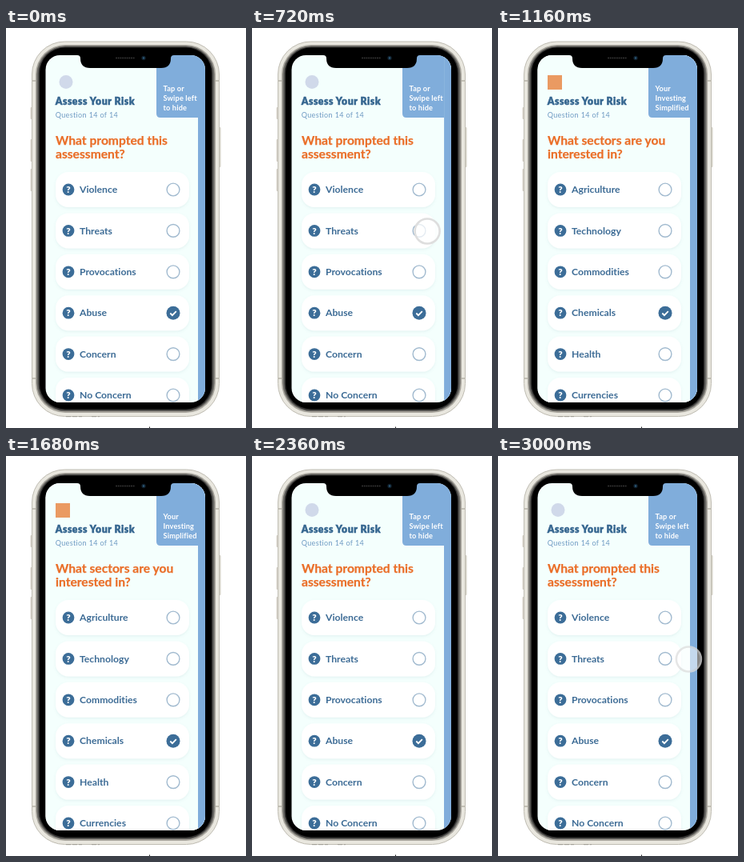
An HTML page that plays this animation: 300x500 px, repeating every 3040 ms.

```html
<!DOCTYPE html>
<html lang="en">
<head>
<meta charset="utf-8">
<title>Swipe to hide</title>
<style>
  html, body { margin: 0; width: 100%; height: 100%; overflow: hidden; background: #fff; }
  svg { display: block; width: 300px; height: 500px; font-family: Lato, "Open Sans", sans-serif; font-weight: 700; font-variant-ligatures: none; }
  .tab { font-size: 9.2px; letter-spacing: .15px; fill: #fff; }
  .title { font-size: 12.2px; font-weight: 900; letter-spacing: .55px; fill: #34658f; stroke: #34658f; stroke-width: .5px; }
  .count { font-size: 9px; font-weight: 400; letter-spacing: .37px; fill: #6f9ac3; }
  .head { font-size: 15.6px; fill: #ea6e28; stroke: #ea6e28; stroke-width: .25px; }
  .item { font-size: 12.2px; fill: #3c6b95; }
  .help { font-size: 11.5px; font-weight: 900; fill: #fff; text-anchor: middle; }
</style>
</head>
<body>
<svg viewBox="0 0 300 500">
  <defs>
    <clipPath id="screen"><rect x="49.5" y="34" width="199.500" height="434" rx="18"/></clipPath>
    <clipPath id="wipe"><rect id="reveal" y="0" width="300" height="500"/></clipPath>
    <filter id="soft" x="-10%" y="-20%" width="120%" height="150%">
      <feDropShadow dx="0" dy="1.5" stdDeviation="1.5" flood-color="#6aa0a8" flood-opacity=".13"/>
    </filter>
  </defs>

  <!-- phone body -->
  <g fill="#d5d2c8">
    <rect x="30.5" y="99" width="3" height="15" rx="1"/>
    <rect x="30.5" y="139" width="3" height="28" rx="1"/>
    <rect x="30.5" y="176" width="3" height="28" rx="1"/>
    <rect x="265.5" y="124" width="3" height="50" rx="1"/>
  </g>
  <rect x="32.5" y="17" width="234" height="468.500" rx="41" fill="#e9e7df" stroke="#bfbcb2"/>
  <path d="M32 66h5M262 66h5M32 438h5M262 438h5" stroke="#c2bfb5" stroke-width="2"/>
  <path d="M75 485.700h20M107 485.700h10" stroke="#9c9990" stroke-dasharray="6 2"/>
  <rect x="37" y="21" width="225" height="460" rx="37" fill="#aaa79f"/>
  <rect x="38.500" y="22.300" width="222" height="457" rx="35.500" fill="#6b6a66"/>
  <rect x="40.500" y="23.500" width="218" height="454.500" rx="33.500" fill="#333231"/>
  <rect x="42" y="24.500" width="215" height="452" rx="32"/>
  <path d="M179.500 498.500V500" stroke="#222"/>

  <g clip-path="url(#screen)">
    <g id="before"></g>
    <g clip-path="url(#wipe)"><g id="after"></g></g>
  </g>

  <!-- notch -->
  <path d="M89 33v1q4 0 4 4q0 12 12 12h89q12 0 12-12q0-4 4-4v-1z" fill="#000"/>
  <path d="M138 37.500h23" stroke="#333" stroke-width="2" stroke-linecap="round" stroke-dasharray=".1 2.6"/>
  <circle cx="172" cy="37.500" r="2.700" fill="#10202c"/>
  <circle cx="172" cy="37.500" r="1.200" fill="#2c5878"/>

  <circle id="touch" cy="254" r="15.500" fill="#fff" fill-opacity=".72" stroke="#dedede" stroke-width="2.600"/>
</svg>
<script>
const $ = id => document.getElementById(id);
const text = (cls, x, y, s) => `<text class="${cls}" x="${x}" y="${y}">${s}</text>`;
const lines = (cls, x, y, gap, list) => list.map((s, i) => text(cls, x, y + i * gap, s)).join('');

function option(label, i) {
  const y = 202 + i * 51.4;
  const radio = i === 3
    ? `<circle cx="209" cy="${y}" r="8.5" fill="#3c6d98"/>
       <path d="M205.3 ${y + .3}l2.6 2.6l4.9-5" fill="none" stroke="#fff" stroke-width="1.8"/>`
    : `<circle cx="209" cy="${y}" r="7.9" fill="#fff" stroke="#a1bacf" stroke-width="1.4"/>`;
  return `<rect x="62" y="${y - 22}" width="167" height="44" rx="16" fill="#fff" filter="url(#soft)"/>
    <circle cx="78" cy="${y}" r="7.4" fill="#3c6d98"/>` +
    text('help', 78, y + 4.1, '?') + text('item', 92, y + 4.2, label) + radio;
}

function page(icon, tab, heading, options) {
  return `<rect x="49" y="34" width="200" height="434" fill="#f4fffd"/>
    <path d="M188 34v73q0 5 5 5h47v356h9V34z" fill="#80addb"/>` + icon +
    lines('tab', 196.5, 79, 12.2, tab) +
    text('title', 61.7, 96, 'Assess Your Risk') +
    text('count', 61.7, 112, 'Question 14 of 14') +
    lines('head', 62, 146, 16.8, heading) +
    options.map(option).join('');
}

$('before').innerHTML = page(
  '<circle cx="75" cy="67.5" r="8.5" fill="#d0d9ea"/>',
  ['Tap or', 'Swipe left', 'to hide'],
  ['What prompted this', 'assessment?'],
  ['Violence', 'Threats', 'Provocations', 'Abuse', 'Concern', 'No Concern']);
$('after').innerHTML = page(
  '<rect x="62" y="59" width="18" height="18" fill="#ea9a62"/>',
  ['Your', 'Investing', 'Simplified'],
  ['What sectors are you', 'interested in?'],
  ['Agriculture', 'Technology', 'Commodities', 'Chemicals', 'Health', 'Currencies']);

const LOOP = 3040, CYCLE = 2360, STEP = 40;
const clamp = v => Math.min(1, Math.max(0, v));

function draw(now) {
  const t = Math.floor(now % LOOP / STEP) * STEP % CYCLE;
  const ease = (1 - Math.cos(Math.PI * clamp((t - 599) / 535))) / 2;
  const x = 241 - 181 * ease;
  $('touch').setAttribute('cx', x);
  $('touch').setAttribute('opacity', clamp((t - 580) / 80) * clamp((1000 - t) / 200));
  // the new page follows the finger's right edge, then runs past the left side
  $('reveal').setAttribute('x', x + 21 - 34 * ease ** 5);
}

const start = performance.now();
function tick() {
  draw(performance.now() - start);
  requestAnimationFrame(tick);
}
tick();
</script>
</body>
</html>
```
